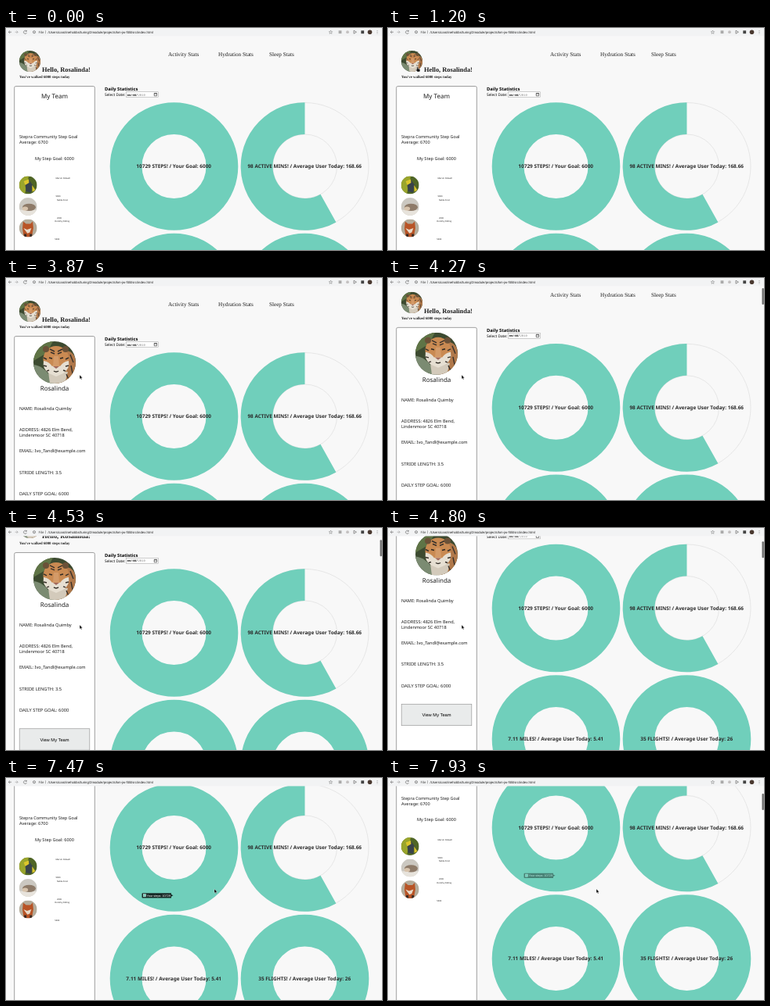
Animation, 480 px wide and 284 px high, one loop 8000 ms. Source, as an HTML page:

```html
<!DOCTYPE html>
<html lang="en">
<head>
<meta charset="utf-8">
<title>Step dashboard</title>
<style>
html, body { margin: 0; width: 100%; height: 100%; overflow: hidden; background: #f8f8f8; }
svg { display: block; width: 100vw; height: 100vh; }
text { font-family: "Noto Sans", "Open Sans", sans-serif; white-space: pre; text-rendering: geometricPrecision; }
.serif { font-family: "Liberation Serif", serif; }
.arial { font-family: "Liberation Sans", sans-serif; }
.mono { font-family: "Liberation Mono", monospace; }
.bold { font-weight: 700; }
.mid { text-anchor: middle; }
</style>
</head>
<body>
<svg id="stage" viewBox="0 0 480 284" preserveAspectRatio="none">
  <defs>
    <clipPath id="round"><circle r="27"/></clipPath>
    <g id="tiger" clip-path="url(#round)">
      <rect x="-27" y="-27" width="54" height="54" fill="#3c4a30"/>
      <path d="M-27-27H-2L-10-12-27-2Z" fill="#5f7446"/>
      <path d="M-27 3Q-14 4-4 20L-2 27H-27Z" fill="#7b8b72"/>
      <path d="M8-16Q27-16 27 0V27H2Z" fill="#b0784a"/>
      <path d="M-8 12H17L13 27H-6Z" fill="#d3cabb"/>
      <ellipse cx="2" cy="-4" rx="16.5" ry="17" fill="#c98a52"/>
      <circle cx="-11" cy="-17" r="4" fill="#6a5138"/>
      <circle cx="14" cy="-17" r="4" fill="#6a5138"/>
      <path d="M-14-2Q-7-1-3 5L1 2 7 5Q11-1 18-2 20 8 11 14L2 18-7 14Q-16 8-14-2Z" fill="#e6dfd2"/>
      <path d="M-1-8H5L6 5H-2Z" fill="#d39a68"/>
      <path d="M-2 5H6L2 8Z" fill="#a2685a"/>
      <path d="M-6-17 0-14M10-17 4-14M-5-13 0-11M9-13 4-11M-14-6-10-4M18-6 14-4M-14 4-10 5M18 4 14 5M-10 11-7 10M14 11 11 10M20-10 24 0M21 4 23 14M15 15 19 24" fill="none" stroke="#37302a" stroke-width="1.4"/>
      <path d="M-7-6-3-5M11-6 7-5M-1 11Q2 13 5 11" fill="none" stroke="#2c2721" stroke-width="1.5"/>
    </g>
    <g id="bird" clip-path="url(#round)">
      <rect x="-27" y="-27" width="54" height="54" fill="#4f6526"/>
      <path d="M-27-27H2L-10 27H-27Z" fill="#9aa52c"/>
      <path d="M2-17 14 0 9 23-6 19-9-3Z" fill="#39434a"/>
      <path d="M-13-12 2-18 3-7-9 0ZM12 0 22 15 13 20Z" fill="#dcc62c"/>
    </g>
    <g id="hedgehog" clip-path="url(#round)">
      <rect x="-27" y="-27" width="54" height="54" fill="#cbc8c1"/>
      <path d="M-27 10H27V27H-27Z" fill="#e7e3dc"/>
      <ellipse cx="3" cy="2" rx="20" ry="11" fill="#8e7b69"/>
      <ellipse cx="-9" cy="6" rx="9" ry="6" fill="#d7c3ac"/>
    </g>
    <g id="fox" clip-path="url(#round)">
      <rect x="-27" y="-27" width="54" height="54" fill="#b4ac9b"/>
      <path d="M-15-20-6-13H7L14-20 16 0 11 27H-13L-17 1Z" fill="#b85426"/>
      <path d="M-14 0-3 5 10 0 5 13-2 16Z" fill="#e8d9c7"/>
      <path d="M-12 18H-5V27H-12ZM5 18H12V27H5Z" fill="#372a24"/>
    </g>
  </defs>
  <rect width="480" height="284" fill="#f8f8f8"/>
  <g id="page"></g>
  <g id="bar"></g>
  <rect id="thumb" x="477.5" width="2.3" height="21" rx="1" fill="#6a6a6a"/>
  <g id="cursor">
    <path id="arrow" d="M0 0V5.2L1.2 4.1 2 5.9 2.9 5.5 2.1 3.8H3.7Z" fill="#000" stroke="#fff" stroke-width=".35"/>
    <path id="hand" d="M0 0Q.9-.7 1.2.4V2L3.6 2.7Q4.2 3 4 4L3.6 6H.5L-1.4 3.6Q-1.3 2.7-.2 3.5Z" fill="#111" stroke="#fff" stroke-width=".35"/>
  </g>
</svg>
<script>
const LOOP = 8000, STEP = 1000 / 15;
const TEAL = "#70cfbb";
const $ = id => document.getElementById(id);

const text = (x, y, size, str, cls = "", fill = "#1c1c1c") =>
  `<text x="${x}" y="${y}" font-size="${size}" class="${cls}" fill="${fill}">${str}</text>`;
const photo = (id, x, y, r) =>
  `<use href="#${id}" transform="translate(${x} ${y}) scale(${r / 27})"/>`;

function ring(cx, cy, share, label) {
  const R = 81.8, r = 41, a = 2 * Math.PI * (1 - share);
  const at = q => `${cx + q * Math.sin(a)} ${cy - q * Math.cos(a)}`;
  const shape = share === 1
    ? `<circle cx="${cx}" cy="${cy}" r="${(R + r) / 2}" fill="none" stroke="${TEAL}" stroke-width="${R - r}"/>`
    : `<g fill="none" stroke="#dedede" stroke-width=".7"><circle cx="${cx}" cy="${cy}" r="${R - .3}"/>
       <circle cx="${cx}" cy="${cy}" r="${r}"/></g>
       <path fill="${TEAL}" d="M${at(R)}A${R} ${R} 0 1 1 ${cx} ${cy - R}V${cy - r}A${r} ${r} 0 1 0 ${at(r)}Z"/>`;
  return shape + text(cx - .3, cy + 2.4, 6.45, label, "bold mid", "#2b2b2b");
}

const friends = [
  ["bird", 201, 63.5, "Marvin Ostwell", "9000"],
  ["hedgehog", 228.5, 65, "Nelda Frost", "2000"],
  ["fox", 256, 62.3, "Dorothy Pelling", "5000"]
];

const team = text(62, 89.5, 8, "My Team", "mid") +
  text(17, 141, 5.5, "Stepra Community Step Goal") +
  text(17, 148.3, 5.5, "Average: 6700") +
  text(62, 168.5, 5.55, "My Step Goal: 6000", "mid") +
  friends.map(([id, y, x, name, goal]) => photo(id, 28.2, y, 11.4) +
    text(x, y - 8, 2.6, name) + text(x, y + 15, 2.6, goal)).join("");

const profile = photo("tiger", 62, 108, 27) +
  text(62, 144.3, 8, "Rosalinda", "mid") +
  text(17, 169, 5.6, "NAME: Rosalinda Quimby") +
  text(17, 196, 5.6, "ADDRESS: 4826 Elm Bend,") +
  text(17, 203, 5.6, "Lindenmoor SC 40718") +
  text(17, 223.3, 5.6, "EMAIL: Ivo_Tandl@example.com") +
  text(17, 250.7, 5.75, "STRIDE LENGTH: 3.5") +
  text(17, 278.2, 5.75, "DAILY STEP GOAL: 6000") +
  `<rect id="button" x="17.2" y="299.8" width="89.6" height="27.4" fill="#e9ebeb" stroke-width=".7"/>` +
  text(62, 315.6, 5.75, "View My Team", "arial mid", "#000");

$("page").innerHTML = photo("tiger", 30.5, 42.5, 13.6) +
  text(46, 56.3, 8.4, "Hello, Rosalinda!", "serif bold") +
  text(17, 64.2, 4.8, "You've walked 6000 steps today", "serif bold") +
  text(207, 35.6, 7.2, "Activity Stats", "serif") +
  text(271, 35.6, 7.2, "Hydration Stats", "serif") +
  text(336, 35.6, 7.2, "Sleep Stats", "serif") +
  `<rect x="10.7" y="74.5" width="102.6" height="420" rx="2" fill="#fff" stroke="#777" stroke-width=".7"/>
   <g id="team">${team}</g><g id="profile">${profile}</g>` +
  text(126, 80.4, 5.75, "Daily Statistics", "bold", "#000") +
  text(126, 87, 4.75, "Select Date:", "", "#000") +
  `<rect x="153.3" y="81.8" width="41" height="6.6" fill="#fff" stroke="#888" stroke-width=".4"/>` +
  text(154.7, 86.5, 3.8, "mm/dd/", "mono bold") + text(168.6, 86.5, 3.8, "2019", "mono", "#777") +
  `<path d="M189.2 83.4H192.6V86.8H189.2ZM189.2 84H192.6" fill="none" stroke="#222" stroke-width=".6"/>` +
  ring(214.5, 177, 1, "10729 STEPS! / Your Goal: 6000") +
  ring(381.5, 177, 98 / 168.66, "98 ACTIVE MINS! / Average User Today: 168.66") +
  ring(214.5, 344.5, 1, "7.11 MILES! / Average User Today: 5.41") +
  ring(381.5, 344.5, 1, "35 FLIGHTS! / Average User Today: 26") +
  `<g id="tip"><path d="M174.5 235.2H211V237L213.5 238.3 211 239.6V241.4H174.5Q173.5 241.4 173.5 240.4V236.2Q173.5 235.2 174.5 235.2Z" fill="#000" fill-opacity=".8"/>
   <rect x="175.2" y="236.5" width="3.4" height="3.4" fill="${TEAL}" stroke="#fff" stroke-width=".4"/>` +
  text(179.6, 239.7, 3.8, "Your steps: 10729", "arial", "#fff") + `</g>`;

$("bar").innerHTML = `<rect width="480" height="10.4" fill="#f2f3f4"/>
  <g fill="none" stroke="#555" stroke-width=".6">
    <path d="M7 5.2H3.4M5 3.5 3.3 5.2 5 6.9"/>
    <path d="M11.5 5.2H15.1M13.5 3.5 15.2 5.2 13.5 6.9" stroke="#999"/>
    <path d="M26 4A2 2 0 1 0 26.4 6M26.3 2.8V4.3H24.8"/>
    <circle cx="36" cy="5.2" r="1.6"/><path d="M36 5V6.1M36 4.1V4.5M50.5 3.2V7.2" stroke-width=".4"/>
    <path d="M414.5 3 415.2 4.5 416.7 4.7 415.6 5.8 415.9 7.3 414.5 6.5 413.1 7.3 413.4 5.8 412.3 4.7 413.8 4.5Z" stroke-width=".4"/>
    <path d="M444 3.2 447.4 5.2 444 7.2Z"/>
  </g>
  <rect x="453.3" y="3.3" width="3.8" height="3.9" fill="#444"/>
  <rect x="424.6" y="3.3" width="3.8" height="3.8" fill="#aaa"/><circle cx="436" cy="5.2" r="1.9" fill="#c4c1c1"/>
  <circle cx="464.5" cy="5.2" r="2.8" fill="#4a3930"/>
  <g fill="#555"><circle cx="474" cy="3.5" r=".45"/><circle cx="474" cy="5.2" r=".45"/><circle cx="474" cy="6.9" r=".45"/></g>` +
  text(41.5, 6.7, 4.3, "File", "", "#444") +
  text(53.5, 6.7, 4.3, "/Users/carolinehobbs/turing/2module/projects/km-jw-fitlit/src/index.html", "arial", "#222");

// Keys are [time, value, ...]; values are joined linearly or with a smooth step.
function track(keys, t, smooth) {
  const i = keys.findIndex(k => k[0] > t);
  if (i === 0) return keys[0].slice(1);
  if (i < 0) return keys[keys.length - 1].slice(1);
  const a = keys[i - 1], b = keys[i];
  let u = (t - a[0]) / (b[0] - a[0]);
  if (smooth) u = u * u * (3 - 2 * u);
  return a.slice(1).map((v, n) => v + (b[n + 1] - v) * u);
}

const scrollKeys = [[4070, 0], [4200, 5], [4330, 17], [4533, 43], [4800, 74.5], [4933, 84.5], [5067, 88],
  [7610, 88], [7733, 95], [7933, 113.5]];
const mouseKeys = [[0, 140, 190], [733, 36, 56], [870, 36, 56], [1267, 37, 49.5], [3270, 37, 49.5],
  [3867, 94, 124], [5340, 94, 124], [6133, 63, 228], [6930, 63, 228], [7467, 266, 142]];
const tipKeys = [[7270, 0], [7400, 1], [7800, 1], [8000, .2]];
const thumbKeys = [[4070, 0], [4133, 1], [5400, 1], [5600, 0], [7600, 0], [7667, 1]];

const show = (id, on) => $(id).style.display = on ? "" : "none";

function draw(now) {
  const t = Math.floor((now % LOOP + 5) / STEP) * STEP;
  const [scroll] = track(scrollKeys, t);
  const [x, y] = track(mouseKeys, t, true);
  const open = t >= 2395 && t < 6995;
  const onButton = open && x > 17 && x < 107 && y + scroll > 300 && y + scroll < 327;
  const onPhoto = Math.hypot(x - 30.5, y + scroll - 42.5) < 13.6;

  $("page").setAttribute("transform", `translate(0 ${-scroll})`);
  show("team", !open);
  show("profile", open);
  $("button").setAttribute("stroke", onButton ? "#f0805f" : "#999");
  $("tip").setAttribute("opacity", track(tipKeys, t)[0]);
  $("thumb").setAttribute("opacity", track(thumbKeys, t)[0]);
  $("thumb").setAttribute("y", 12.3 + scroll * .068);
  $("cursor").setAttribute("transform", `translate(${x} ${y})`);
  show("cursor", t > 60);
  show("hand", onButton || onPhoto);
  show("arrow", !(onButton || onPhoto));
}

const start = performance.now();
function tick() {
  draw(performance.now() - start);
  requestAnimationFrame(tick);
}
tick();
</script>
</body>
</html>
```
